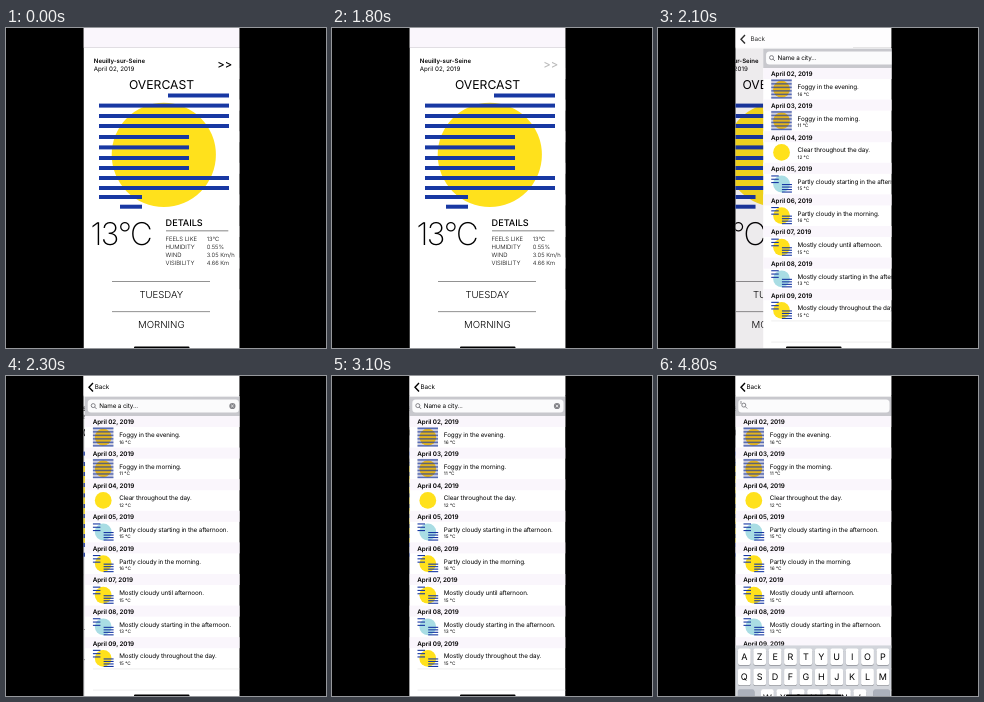
Animation of 320 by 320 pixels, one loop 4.9 s. Source, as an HTML page:

```html
<!DOCTYPE html>
<html lang="en">
<head>
<meta charset="utf-8">
<title>Weather app</title>
<style>
html, body { margin: 0; width: 100%; height: 100%; overflow: hidden; background: #000; }
svg { display: block; width: 100vw; height: 100vh; }
text { font-family: Inter, "Liberation Sans", sans-serif; text-rendering: geometricPrecision; white-space: pre; }
</style>
</head>
<body>
<svg id="stage" viewBox="0 0 320 320"></svg>
<script>
const LOOP = 4900, STEP = 100;
const LEFT = 77.5, WIDTH = 156;
const BLUE = '#1838a3', YELLOW = '#ffe11c', PALE = '#a9dde4', TINT = '#faf6fc';

const rect = (x, y, w, h, fill, extra = '') =>
  `<rect x="${x}" y="${y}" width="${w}" height="${h}" fill="${fill}" ${extra}/>`;
const circle = (x, y, r, fill) => `<circle cx="${x}" cy="${y}" r="${r}" fill="${fill}"/>`;
const label = (x, y, size, str, weight = 400, extra = '') =>
  `<text x="${x}" y="${y}" font-size="${size}" font-weight="${weight}" ${extra}>${str}</text>`;
const mid = 'text-anchor="middle"';
const tight = 'letter-spacing="-.02em"';

// Today's forecast
function todayPage() {
  // left, right, centre line
  const bars = [
    [162, 223, 67.5], [93, 223, 77.6], [93, 223, 88], [93, 223, 98],
    [93, 183, 109], [93, 183, 119.4], [93, 183, 130], [93, 183, 140],
    [93, 223, 150], [93, 223, 160], [93, 136, 169], [114, 136, 178.7]
  ];
  const details = [
    ['FEELS LIKE', '13°C'], ['HUMIDITY', '0.55%'],
    ['WIND', '3.05 Km/h'], ['VISIBILITY', '4.66 Km']
  ];
  return rect(LEFT, 0, WIDTH, 320, '#fff') +
    label(87.8, 34.8, 6.05, 'Neuilly-sur-Seine', 600) +
    label(87.8, 43.4, 6.2, 'April 02, 2019') +
    label(211.3, 39.7, 11.2, '&gt;&gt;', 500, 'id="next"') +
    rect(233, 32, .5, 8, '#555', 'id="edge"') +
    label(155.5, 60.5, 12.2, 'OVERCAST', 400, mid) +
    circle(157.8, 126.8, 52.1, YELLOW) +
    bars.map(([a, b, y]) => rect(a, y - 2, b - a, 4, BLUE)).join('') +
    label(84.5, 216.8, 31.3, '13°C', 200, 'letter-spacing="-.05em"') +
    label(159.6, 198.4, 9.1, 'DETAILS', 500) +
    rect(160, 202.4, 62.3, .9, '#777') +
    details.map(([k, v], i) => {
      const y = 213.2 + i * 8;
      return label(159.4, y, 5.95, k, 300) + label(200.7, y, 5.85, v, 300);
    }).join('') +
    rect(106, 253, 98, .8, '#777') +
    label(155.3, 270.3, 9.6, 'TUESDAY', 300, mid) +
    rect(106, 283.3, 98, .8, '#777') +
    label(155.3, 300.3, 9.7, 'MORNING', 300, mid);
}

// Small icon in a 20 x 20 box
function icon(kind, y) {
  const x = 85.5, cx = x + 10.3, cy = y + 10;
  const lines = (n, lx, ly, w, gap, h) =>
    Array.from({ length: n }, (_, i) => rect(lx, ly + i * gap, w, h, BLUE)).join('');
  if (kind === 'fog') {
    return rect(x, y, 20.5, 19.3, '#cfcfdc') + circle(cx, cy, 8.4, '#e2b41f') +
      `<g opacity=".65">${lines(6, x, y + .4, 20.5, 3.5, 1.5)}</g>`;
  }
  const disc = circle(cx, cy, 8.4, kind === 'night' ? PALE : YELLOW);
  if (kind === 'clear') return disc;
  return disc + lines(3, x, y + 1.4, 7.5, 3.3, 1.1) + lines(4, x + 10.7, y + 10, 10, 2.5, 1.1);
}

function listPage() {
  const days = [
    ['fog', 'Foggy in the evening.', 16],
    ['fog', 'Foggy in the morning.', 11],
    ['clear', 'Clear throughout the day.', 12],
    ['night', 'Partly cloudy starting in the afternoon.', 15],
    ['day', 'Partly cloudy in the morning.', 16],
    ['day', 'Mostly cloudy until afternoon.', 15],
    ['night', 'Mostly cloudy starting in the afternoon.', 13],
    ['day', 'Mostly cloudy throughout the day.', 15]
  ];
  const rows = days.map(([kind, note, temp], i) => {
    const y = 40 + i * 31.6;
    return rect(LEFT, y, WIDTH, 11, TINT) +
      label(85.3, y + 8.4, 6.3, `April 0${i + 2}, 2019`, 600, 'letter-spacing="-.01em"') +
      icon(kind, y + 11.2) +
      label(111.8, y + 21.2, 6.3, note, 400, tight) +
      label(111.8, y + 27.5, 4.7, `${temp} °C`);
  }).join('');
  return rect(LEFT, 20, WIDTH, 300, '#fff') + rows +
    rect(85.5, 292.7, 148.5, .5, '#ddd') + rect(85.5, 313.8, 148.5, .5, '#ddd') +
    rect(LEFT, 20.4, WIDTH, 19.6, '#c8c8cd') +
    rect(80.3, 23.4, 151.2, 13.2, '#fbfbfc', 'rx="3.5"') +
    `<g id="lens" fill="none" stroke="#77777c" stroke-width=".9"><circle cx="85.8" cy="29.6" r="2"/>` +
    `<path d="M87.2 31 l2 2"/></g>` +
    rect(82.6, 25, .8, 3, '#77777c', 'id="caret"') +
    `<g id="query">${label(91.8, 32.2, 6.3, 'Name a city...', 400, tight)}</g>` +
    `<g id="clear">${circle(225, 30, 3.1, '#85858a')}` +
    `<path d="M223.8 28.8 l2.4 2.4 m0 -2.4 l-2.4 2.4" stroke="#fff" stroke-width=".7"/></g>`;
}

// Drawn with its top edge at y = 0
function keyboard() {
  const key = (x, y, w, fill) =>
    rect(x, y + .7, w, 16.6, '#8d9097', 'rx="2"') + rect(x, y, w, 16.6, fill, 'rx="2"');
  const row = (chars, x0, y) => [...chars].map((c, i) => {
    const x = x0 + i * 15.4;
    return key(x - 6.4, y, 12.8, '#fff') + label(x, y + 11.7, 9, c, 400, mid);
  }).join('');
  return rect(LEFT, 0, WIDTH, 140, '#d2d5db') +
    row('AZERTYUIOP', 86.3, 3) + row('QSDFGHJKLM', 86.3, 23.3) +
    key(79.9, 43.8, 16.5, '#acb1bb') + row('WXCVBN’', 109.4, 43.8) +
    key(215.4, 43.8, 16.5, '#acb1bb');
}

const stage = document.getElementById('stage');
stage.innerHTML =
  `<clipPath id="screen">${rect(LEFT, 0, WIDTH, 320, '#fff')}</clipPath>` +
  rect(0, 0, 320, 320, '#000') +
  `<g clip-path="url(#screen)">` +
  `<g id="today">${todayPage()}</g>` +
  rect(LEFT, 0, WIDTH, 320, '#24142c', 'id="dim"') +
  `<g id="list">${listPage()}</g>` +
  rect(LEFT, 0, WIDTH, 19.4, TINT) + rect(LEFT, 19, WIDTH, .6, '#cfccd2', 'id="rule"') +
  rect(LEFT, 0, WIDTH, 20.4, '#fff', 'id="bar"') +
  `<g id="back"><path d="M87 7 L83 11.2 L87 15.4" fill="none" stroke="#000" stroke-width="1.4"/>` +
  `<g id="backLabel">${label(88.6, 13.1, 6.3, 'Back', 400, tight)}</g></g>` +
  `<g id="keys">${keyboard()}</g>` +
  rect(128, 318.4, 55.5, 3, '#000', 'rx="1"') +
  `</g>`;

const el = {};
stage.querySelectorAll('[id]').forEach(n => el[n.id] = n);
const move = (n, x, y = 0) => n.setAttribute('transform', `translate(${x} ${y})`);
const fade = (n, v) => n.setAttribute('opacity', v);

// Critically damped spring: share of the way still to go
const rest = ms => {
  const a = Math.max(0, ms) * .018;
  return (1 + a) * Math.exp(-a);
};

function draw(t) {
  const left = rest(t - 1925), done = 1 - left;
  move(el.today, -.3 * WIDTH * done);
  fade(el.dim, .1 * done);
  move(el.list, WIDTH * left);
  fade(el.bar, done);
  fade(el.rule, left);
  fade(el.back, done);
  move(el.backLabel, 22 * left);

  el.next.setAttribute('fill', t >= 1800 ? '#bbb' : '#000');
  fade(el.edge, t >= 1300 ? 1 : 0);

  const typing = t >= 4700;
  fade(el.query, typing ? 0 : 1);
  fade(el.clear, typing ? 0 : t >= 4400 ? .6 : 1);
  fade(el.caret, typing ? 1 : 0);
  move(el.lens, 0, typing ? -.5 : 0);
  move(el.keys, 0, 183 + 139 * rest(t - 4727));
}

function tick() {
  const t = performance.now() % LOOP;
  draw(Math.floor(t / STEP) * STEP);
  requestAnimationFrame(tick);
}
tick();
</script>
</body>
</html>
```
